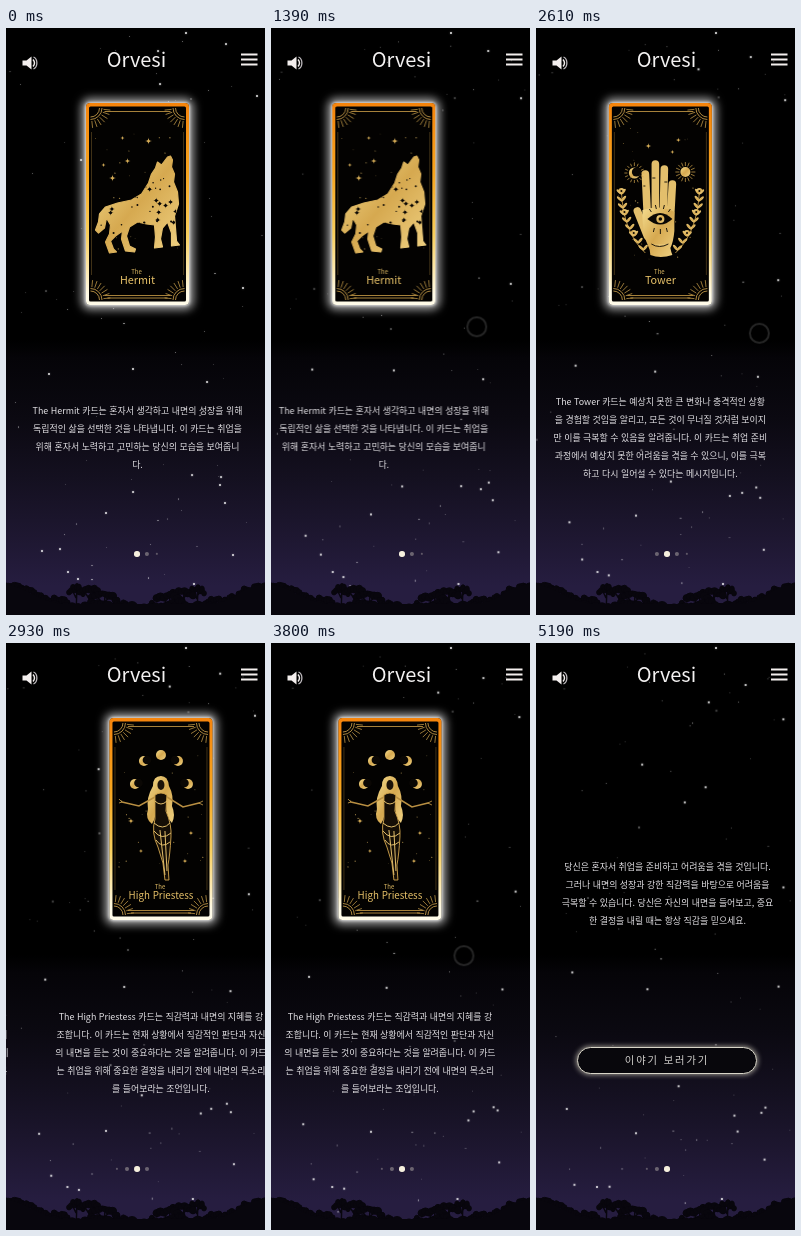
These frames come from a looping animation (259 px wide and 587 px high, 5240 ms). An HTML page:

```html
<!DOCTYPE html>
<html lang="ko">
<head>
<meta charset="utf-8">
<title>Tarot reading</title>
<style>
@property --active { syntax: "<number>"; inherits: true; initial-value: 0; }

html, body { margin: 0; width: 100%; height: 100%; overflow: hidden; background: #000; }
.stage {
  position: relative; width: 259px; height: 587px; overflow: hidden; color: #e2e0e4;
  font-family: "Noto Sans CJK KR", "Noto Sans KR", "Noto Sans", sans-serif;
  background: linear-gradient(#000 0 312px, #050408 330px, #0b0911 390px, #141020 450px, #1e1731 510px, #261d40 558px);
}
.stage > *, .slide > *, .star, .dot { position: absolute; }
svg { overflow: visible; }

.star { border-radius: 50%; background: #fff; animation: drift 5240ms linear infinite; }
@keyframes drift { to { transform: translate(var(--dx), var(--dy)); } }

.scene { left: 0; top: 0; }
h1 { margin: 0; left: 1px; top: 16px; width: 259px; font-size: 20px; line-height: 30px; font-weight: 400; text-align: center; color: #f4f2f2; }

.track { left: 0; top: 0; width: 1036px; height: 587px; animation: swipe 5240ms infinite; }
@keyframes swipe {
  0%, 24.81% { transform: translateX(0); animation-timing-function: ease-in; }
  28.63% { transform: translateX(-70px); animation-timing-function: ease; }
  34.35%, 48.85% { transform: translateX(-259px); animation-timing-function: ease-in; }
  52.58% { transform: translateX(-329px); animation-timing-function: ease; }
  58.3%, 71.47% { transform: translateX(-518px); animation-timing-function: ease-in; }
  74.43% { transform: translateX(-588px); animation-timing-function: ease; }
  80.15%, 100% { transform: translateX(-777px); }
}
.slide { position: absolute; top: 0; width: 259px; height: 587px; }
.card {
  left: 79.5px; top: 75px; width: 103px; height: 202px; border-radius: 4px;
  background: linear-gradient(#f5840c, #f7a51e 35%, #f9cf5c 65%, #fffbe8 95%);
  box-shadow: 0 0 3px 1px rgba(255,255,255,.7), 0 0 8px 5px rgba(255,255,255,.6);
}
.card svg { position: absolute; left: 0; top: 0; }
.text { left: 2px; width: 259px; margin: 0; text-align: center; white-space: pre; font-size: 8.93px; line-height: 18px; }
.button {
  left: 41px; top: 404px; width: 180px; height: 27px; box-sizing: border-box;
  border: 1.5px solid #d8d5c8; border-radius: 14px; background: #08070c;
  box-shadow: 0 0 5px 1px rgba(235,230,210,.6); color: #d5d3d0;
  font-size: 10.3px; line-height: 24px; letter-spacing: 1.9px; text-align: center;
}

.dots { left: 131px; top: 526px; animation: page 5240ms infinite; transform: translateX(calc(var(--active) * -10px)); }
@keyframes page {
  0%, 28.63% { --active: 0; }
  32.4%, 52.58% { --active: 1; }
  56.4%, 74.43% { --active: 2; }
  78.2%, 100% { --active: 3; }
}
.dot {
  --gap: max(var(--i) - var(--active), var(--active) - var(--i));
  left: calc(var(--i) * 10px - 2.75px); top: -2.75px; width: 5.5px; height: 5.5px; border-radius: 50%;
  background: #f6f0de; transform: scale(max(0, 1 - .33 * var(--gap))); opacity: max(.3, 1 - .65 * var(--gap));
}

.cursor {
  left: -10.5px; top: -10.5px; width: 21px; height: 21px; box-sizing: border-box; border-radius: 50%;
  border: 2px solid rgba(255,255,255,.15); background: rgba(0,0,0,.45); animation: point 5240ms infinite;
}
@keyframes point {
  0%, 22% { transform: translate(224px, 298px); opacity: 0; }
  24.81% { transform: translate(224px, 298px); opacity: 1; animation-timing-function: ease-in; }
  28.63% { transform: translate(154px, 299px); }
  34.35%, 48.85% { transform: translate(230px, 305px); opacity: 1; animation-timing-function: ease-in; }
  52.58% { transform: translate(160px, 303px); opacity: 1; }
  55%, 66% { transform: translate(205px, 312px); opacity: 0; }
  69%, 71.47% { transform: translate(205px, 312px); opacity: 1; animation-timing-function: ease-in; }
  74.43% { transform: translate(135px, 313px); }
  79.5%, 83% { transform: translate(239px, 345px); opacity: 1; }
  86%, 100% { transform: translate(239px, 345px); opacity: 0; }
}
</style>
</head>
<body>
<div class="stage">
  <div id="sky"></div>
  <svg class="scene" id="forest" width="259" height="587" fill="#08060d" stroke="#08060d"></svg>
  <div class="track" id="track"></div>
  <h1>Orvesi</h1>
  <svg class="scene" width="259" height="60" fill="#f4efee">
    <path d="M16.5 32.5h4l5-4v13l-5-4h-4z"/>
    <path d="M27 31.5q3 3.5 0 7" fill="none" stroke="#f4efee" stroke-width="1.4"/>
    <path d="M27.5 29c4.5 2 4.5 10 0 12" fill="none" stroke="#bdb9bd" stroke-width="1.3"/>
    <path d="M235 25.5h16.5v2h-16.5zm0 5h16.5v2h-16.5zm0 5h16.5v2h-16.5z"/>
  </svg>
  <div class="dots" id="dots"></div>
  <div class="cursor"></div>
</div>

<svg width="0" height="0" style="position:absolute">
  <linearGradient id="gold" x1="0" y1="0" x2="1" y2="1">
    <stop offset="0" stop-color="#f4dc8e"/><stop offset=".5" stop-color="#d6a950"/><stop offset="1" stop-color="#f0d283"/>
  </linearGradient>
</svg>

<script>
const $ = id => document.getElementById(id);
const range = (n, f) => Array.from({ length: n }, (_, i) => f(i)).join("");

function seeded(s) {
  return () => (s = (s * 16807) % 2147483647) / 2147483647;
}

// Sky: x, y, radius, then drift in px per second
const bright = [
  [43, 346, 1.4, -1.3, -3.2], [72, 551, 1.3, .3, -1.4], [62, 544, 1.2, -.2, 0],
  [215, 449, 1.2, 2, 4], [214, 457, 1.1, -3, 3], [186, 447, 1.2, 3, 8],
  [219, 475, 1.2, 2, -2], [127, 464, 1.1, 3, -4], [100, 485, 1.2, 0, 1],
  [54, 521, 1.1, -3, 4], [36, 523, 1.2, -1, -11], [188, 556, 1.2, -.4, 0],
  [227, 527, 1.2, .3, -2], [75, 132, 1.2, 6, -2], [154, 56, 1, 3, 17],
  [152, 23, 1.1, 4, 7], [154, 149, 1.1, -1, 2], [237, 260, 1, 2, -3],
  [251, 68, 1.1, -.7, 1.6], [220, 16, 1, -2, 5], [127, 341, 1.1, -3, 1],
  [201, 354, 1, 8, -2], [180, 5, .9, 0, 0]
];

function star(x, y, r, vx, vy, alpha) {
  return `<i class="star" style="left:${x - r}px;top:${y - r}px;width:${2 * r}px;height:${2 * r}px;opacity:${alpha};` +
    `--dx:${vx * 5.24}px;--dy:${vy * 5.24}px;box-shadow:0 0 2px rgba(255,255,255,.5)"></i>`;
}

const rnd = seeded(4711);
$("sky").innerHTML = bright.map(s => star(...s, .9)).join("") +
  range(75, () => star(rnd() * 259, rnd() * 555, .4 + rnd() * .4, rnd() * 10 - 5, rnd() * 10 - 5, .2 + rnd() * .4));

// Forest, mirrored about the middle
function tree(x, top, w) {
  const leaf = i => {
    const t = i / 7 - .5;
    return `<ellipse cx="${x + t * w}" cy="${top + 4 + t * t * 14 + rnd() * 4}" rx="${w / 6}" ry="${2.2 + rnd() * 1.8}"/>`;
  };
  return `<path d="M${x} 587L${x + 1} ${top + 4}M${x} ${top + 16}l${-w / 3} ${-10}M${x} ${top + 14}l${w / 3} -9" stroke-width="1.4"/>` + range(8, leaf);
}
const grove = [[4, 551, 22], [19, 556, 18], [34, 562, 16], [52, 565, 18], [70, 554, 14], [84, 556, 20], [98, 561, 24], [90, 568, 22], [114, 570, 16]];
$("forest").innerHTML = grove.map(([x, y, w]) => tree(x, y, w) + tree(261 - x, y + 1, w)).join("") +
  range(44, i => `<circle cx="${i * 6}" cy="${579 + rnd() * 3}" r="${4 + rnd() * 3}" stroke="none"/>`) +
  `<path d="M0 556q16 4 26 10t30 10h146q20-2 30-10t27-10v31H0z" stroke="none"/>`;

// Cards are drawn about x = 0
const sparkle = (x, y, r) =>
  `<path d="M${x} ${y - r}Q${x} ${y} ${x + r} ${y}Q${x} ${y} ${x} ${y + r}Q${x} ${y} ${x - r} ${y}Q${x} ${y} ${x} ${y - r}"/>`;
const disc = (x, y, r, extra = "") => `<circle cx="${x}" cy="${y}" r="${r}" ${extra}/>`;
const dark = 'fill="#0a0704"';

function rays(x, y, from, to, n, start = 0, span = 360) {
  return `<path stroke="#d6a950" stroke-width=".7" d="${range(n, i => {
    const a = (start + span * i / n) * Math.PI / 180, c = Math.cos(a), s = Math.sin(a);
    return `M${x + c * from} ${y + s * from}L${x + c * to} ${y + s * to}`;
  })}"/>`;
}

function corner(sx, sy) {
  return `<g transform="translate(${47 * sx} ${sy > 0 ? 80 : 272}) scale(${-sx} ${sy})">
    <path d="M0 9A9 9 0 0 0 9 0M0 11.5A11.5 11.5 0 0 0 11.5 0" fill="none" stroke="#d6a950" stroke-width=".8"/>
    ${rays(0, 0, 13, 20, 7, 6, 91)}</g>`;
}

function frame(art, name, size, seed) {
  const r = seeded(seed);
  const dust = range(26, () => disc(r() * 84 - 42, 100 + r() * 135, .3 + r() * .4, 'opacity=".7"'));
  return `<div class="card"><svg width="103" height="202" viewBox="-51.5 75 103 202" fill="url(#gold)">
    <rect x="-48.5" y="78.5" width="97" height="195" rx="1.5" fill="#030201"/>
    <path d="M-33 83.5H33M-33 267.5H33M-30 270H30" stroke="#d0a24a" stroke-width=".8"/>
    <path d="M-46 104V247M46 104V247" stroke="#d0a24a" stroke-width=".6" opacity=".5"/>
    ${corner(-1, 1) + corner(1, 1) + corner(-1, -1) + corner(1, -1) + dust + art}
    <g text-anchor="middle" font-weight="500" fill="#e6c068">
      <text x="-1" y="246" font-size="6">The</text><text y="256" font-size="${size}">${name}</text>
    </g></svg></div>`;
}

function wolf() {
  const r = seeded(92);
  const body = "M30 129L33 128L35 132L34 139L37 146L36 154L40 164L41 176L37 188L38 200L39 213L42 217L34 218L34 205L30 194L25 200L23 211L25 219L17 220L18 209L17 197L9 196L0 194L-8 199L-11 208L-8 218L-2 221L-3 224L-12 223L-16 211L-15 203L-22 208L-27 213L-24 221L-21 224L-28 225L-32 214L-28 206L-27 197L-31 190L-33 200L-39 205L-42 202L-39 194L-38 186L-32 179L-20 175L-6 172L4 166L11 155L14 146L18 140L20 134L24 137L27 133Z";
  return `<clipPath id="wolf"><path d="${body}"/></clipPath>
    <path d="${body}" stroke="url(#gold)" stroke-width="1.2" stroke-linejoin="round"/>
    <g clip-path="url(#wolf)" fill="#0a0704">${range(54, i => {
      const x = -38 + r() * 78, y = 148 + r() * 62;
      return i % 3 ? disc(x, y, .5 + r() * .7) : sparkle(x, y, 3) + disc(x, y, 1.3);
    })}</g>` +
    sparkle(11, 113, 3.5) + sparkle(-10, 133, 3) + sparkle(-25, 150, 3.5) + sparkle(-15, 110, 2) + sparkle(-34, 137, 2);
}

function hand() {
  const finger = (x1, y1, x2, y2) => `M${x1} ${y1}L${x2} ${y2}`;
  const wreath = range(9, i => {
    const t = i / 8, x = 39 - 22 * t * t, y = 166 + 56 * t;
    return `<ellipse cx="${x + 3}" cy="${y}" rx="3.5" ry="1.3" transform="rotate(-45 ${x} ${y})"/>` +
      `<ellipse cx="${x - 3}" cy="${y}" rx="3.5" ry="1.3" transform="rotate(50 ${x} ${y})"/>` +
      (i % 3 ? "" : disc(x, y - 3, 3) + disc(x, y - 3, 1, dark));
  });
  const branch = `<path d="M39 163Q37 205 15 225" fill="none" stroke="#d6a950" stroke-width=".8"/>${wreath}`;
  return `<path fill="none" stroke="#e3bf6c" stroke-width="7.6" stroke-linecap="round"
      d="${finger(-13, 188, -15, 146) + finger(-5, 184, -5, 136) + finger(3, 184, 4, 141) + finger(10, 192, 12, 156) + finger(-13, 208, -23, 183)}"/>
    <path d="M-18 182Q0 176 14 184V203Q13 214 10 220Q11 225 12 227Q0 231-10 227Q-10 222-13 216Q-18 206-18 182Z"/>
    <path d="M-13 191Q0 179 12 191Q0 202-13 191Z" ${dark}/>${disc(0, 191, 4)}${disc(0, 191, 1.8, dark)}
    <path d="M-9 184l-2-3M-4 181l-1-4M3 181l1-4M8 184l2-3M-6 200l-1 4M0 201v5M6 200l1 4M-15 158h-2M-5 150h-3M4 154h3M-9 216q8 5 17 0" stroke="#0a0704" stroke-width=".9"/>
    ${branch}<g transform="scale(-1 1)">${branch}</g>
    ${disc(25, 144, 5) + rays(25, 144, 6, 10, 16) + rays(-26, 145, 7, 10, 16) + disc(-26, 145, 5.5) + disc(-24, 144, 4.5, dark)}` +
    sparkle(-12, 118, 3) + sparkle(18, 112, 2.5) + sparkle(12, 124, 2);
}

function priestess() {
  const moon = (x, y, shade) => disc(x, y, 5) + disc(x + shade, y - 1, 4.3, dark);
  return disc(0, 112, 5) + moon(-17, 118, 3) + moon(17, 118, -3) + moon(-26, 141, 3.5) + moon(27, 141, -3.5) +
    `<path d="M0 133Q-8 133-8 143Q-15 155-13 166Q-16 176-9 181Q-4 174-5 160L5 160Q5 175 11 180Q15 172 11 163Q13 152 8 143Q7 133 0 133Z"/>
    <path d="M-6 154L-22 163L-39 159M6 154L22 164L38 160" fill="none" stroke="#b98f42" stroke-width="1.5" stroke-linecap="round"/>
    <path d="M-39 159l-3-3m3 3l-3 1M38 160l4-2m-4 2l4 2" stroke="#d6a950" stroke-width=".8"/>
    <ellipse cx="0" cy="142" rx="3.5" ry="5" fill="#1b1208"/>
    <path d="M-6 152Q0 148 6 152L5 168Q11 182 10 194Q9 212 7 222L8 237L4 237L2 220L-3 204Q-10 190-6 176Z" fill="#150e06" stroke="#d6a950" stroke-width=".9"/>
    <path d="M-6 158Q0 164 6 158M-7 180Q2 188 9 180M-7 188Q1 198 10 190M-1 187L4 232M4 188L6 228M-5 197Q1 206 9 199" fill="none" stroke="#e3bf6c" stroke-width="1"/>` +
    sparkle(-30, 178, 3) + sparkle(30, 190, 2.5) + sparkle(-20, 208, 2) + sparkle(24, 218, 2.5);
}

const note = (top, lines) => `<p class="text" style="top:${top}px">${lines.join("\n")}</p>`;
const slides = [
  frame(wolf(), "Hermit", 10.8, 31) + note(374, [
    "The Hermit 카드는 혼자서 생각하고 내면의 성장을 위해",
    "독립적인 삶을 선택한 것을 나타냅니다. 이 카드는 취업을",
    "위해 혼자서 노력하고 고민하는 당신의 모습을 보여줍니",
    "다."]),
  frame(hand(), "Tower", 10.8, 57) + note(364.5, [
    "The Tower 카드는 예상치 못한 큰 변화나 충격적인 상황",
    "을 경험할 것임을 알리고, 모든 것이 무너질 것처럼 보이지",
    "만 이를 극복할 수 있음을 알려줍니다. 이 카드는 취업 준비",
    "과정에서 예상치 못한 어려움을 겪을 수 있으니, 이를 극복",
    "하고 다시 일어설 수 있다는 메시지입니다."]),
  frame(priestess(), "High Priestess", 9.8, 83) + note(364.5, [
    "The High Priestess 카드는 직감력과 내면의 지혜를 강",
    "조합니다. 이 카드는 현재 상황에서 직감적인 판단과 자신",
    "의 내면을 듣는 것이 중요하다는 것을 알려줍니다. 이 카드",
    "는 취업을 위해 중요한 결정을 내리기 전에 내면의 목소리",
    "를 들어보라는 조언입니다."]),
  note(214.5, [
    "당신은 혼자서 취업을 준비하고 어려움을 겪을 것입니다.",
    "그러나 내면의 성장과 강한 직감력을 바탕으로 어려움을",
    "극복할 수 있습니다. 당신은 자신의 내면을 들어보고, 중요",
    "한 결정을 내릴 때는 항상 직감을 믿으세요."]) + '<div class="button">이야기 보러가기</div>'
];
$("track").innerHTML = slides.map((s, i) => `<div class="slide" style="left:${i * 259}px">${s}</div>`).join("");
$("dots").innerHTML = range(slides.length, i => `<i class="dot" style="--i:${i}"></i>`);
</script>
</body>
</html>
```
